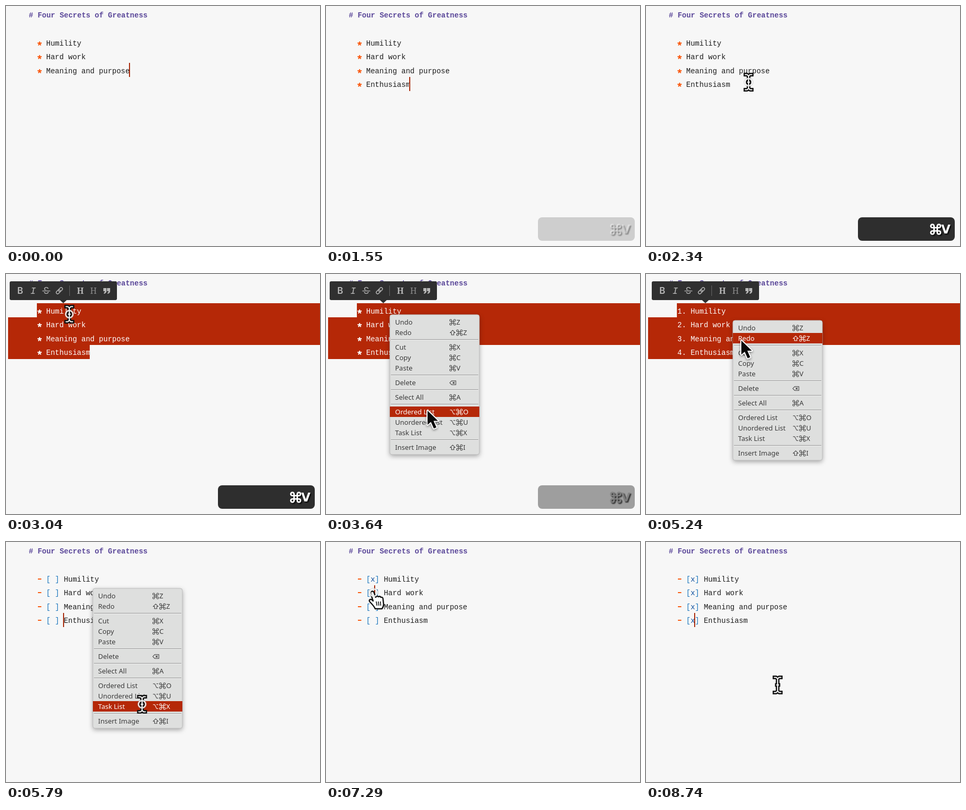
Write an HTML page with a canvas that moves like this. It is 600 by 460 pixels and loops after 9.74 s.

```html
<!DOCTYPE html>
<html lang="en">
<head>
<meta charset="utf-8">
<title>Four Secrets of Greatness</title>
<style>
html, body { margin: 0; width: 100%; height: 100%; overflow: hidden; background: #f7f7f7; }
canvas { display: block; width: 600px; height: 460px; }
</style>
</head>
<body>
<canvas id="stage" width="600" height="460"></canvas>
<script>
(() => {
const ctx = document.getElementById('stage').getContext('2d');
const LOOP = 9740, CH = 8.4, LEFT = 60;
const RED = '#b52807', ORANGE = '#f9590f', BLUE = '#1c76bd', INK = '#1c1c1c';
const MONO = '14px "Liberation Mono", monospace';
const ITEMS = ['Humility', 'Hard work', 'Meaning and purpose', 'Enthusiasm'];

const T = { type: 260, keys: 1550, ordered: 3900, task: 5750 };
const CHECKS = [6880, 7260, 7590, 7890];
const DRAGS = [
  { from: 2350, to: 2850, end: T.ordered, anchor: 160 },
  { from: 4270, to: 4800, end: T.task, anchor: 168 }
];
const MENUS = [
  { x: 122, y: 78, from: 3050, to: 3960 },
  { x: 166, y: 89, from: 5100, to: 5850 }
];
const PRESSES = [[2320, 2850], [3030, 3090], [3860, 3940], [4270, 4800], [5080, 5140], [5720, 5840],
  ...CHECKS.map(t => [t - 10, t + 80])];

// time, x, y, shape used from that time on
const POINTER = [
  [1950, 262, 78, 'beam'], [2100, 286, 128, 'beam'], [2290, 196, 146, 'beam'], [2360, 196, 146, 'beam'],
  [2760, 54, 64, 'beam'], [2860, 54, 64, 'beam'], [3010, 121, 77, 'beam'], [3050, 121, 77, 'arrow'],
  [3600, 194, 262, 'arrow'], [3940, 194, 262, 'beam'], [4230, 172, 150, 'beam'], [4280, 172, 150, 'beam'],
  [4640, 29.5, 78, 'beam'], [4740, 40, 64, 'beam'], [4810, 40, 64, 'beam'], [5060, 165, 87, 'beam'],
  [5100, 165, 87, 'arrow'], [5620, 260, 311, 'arrow'], [5740, 260, 311, 'beam'], [5980, 260, 311, 'beam'],
  [6650, 98, 86, 'hand'], [6800, 91, 71, 'hand'], [6980, 91, 71, 'hand'], [7200, 91, 97, 'hand'],
  [7350, 91, 97, 'hand'], [7530, 91, 123, 'hand'], [7660, 91, 123, 'hand'], [7830, 91, 145, 'hand'],
  [7960, 91, 145, 'hand'], [8060, 112, 166, 'beam'], [8540, 251.5, 274, 'beam']
];

const MENU_ROWS = [
  ['Undo', 'cZ', 14], ['Redo', 'scZ', 34], ['Cut', 'cX', 62], ['Copy', 'cC', 82], ['Paste', 'cV', 102],
  ['Delete', 'd', 130], ['Select All', 'cA', 158], ['Ordered List', 'ocO', 186],
  ['Unordered List', 'ocU', 206], ['Task List', 'ocX', 226], ['Insert Image', 'scI', 254]
];
const RULES = [47, 115, 143, 171, 239];

const clamp = (v, a = 0, b = 1) => Math.min(b, Math.max(a, v));
const ease = p => p * p * (3 - 2 * p);
const within = (t, [a, b]) => t >= a && t < b;
const rowTop = i => Math.round(56 + 26.7 * i);
const baseline = i => Math.round(76 + 26.4 * i);

function text(s, x, y, color, font) {
  if (font) ctx.font = font;
  ctx.fillStyle = color;
  ctx.fillText(s, x, y);
}
function box(x, y, w, h, color, r = 0) {
  ctx.fillStyle = color;
  ctx.beginPath();
  ctx.roundRect(x, y, w, h, r);
  ctx.fill();
}
function stroke(d, color, width) {
  ctx.strokeStyle = color;
  ctx.lineWidth = width;
  ctx.stroke(new Path2D(d));
}
function at(x, y, draw, k = 1) {
  ctx.save();
  ctx.translate(x, y);
  ctx.scale(k, k);
  draw();
  ctx.restore();
}

function star(x, y, color) {
  ctx.strokeStyle = color;
  ctx.lineWidth = 2;
  ctx.beginPath();
  for (let i = 0; i < 5; i++) {
    const a = -Math.PI / 2 + i * Math.PI * 0.4;
    ctx.moveTo(x, y);
    ctx.lineTo(x + 4.1 * Math.cos(a), y + 4.1 * Math.sin(a));
  }
  ctx.stroke();
}

function typed(t) {
  return clamp(Math.floor((t - 300) / 65) + 1, 0, 10);
}

// tint replaces every colour when the text is selected
function list(t, tint) {
  ctx.font = MONO;
  ITEMS.forEach((item, i) => {
    const y = baseline(i);
    let col = 2;
    if (i === 3) {
      if (t < T.type) return;
      item = item.slice(0, typed(t));
    }
    if (t < T.ordered) star(LEFT + 4.2, y - 4, tint || ORANGE);
    else if (t < T.task) {
      text(i + 1 + '.', LEFT, y, tint || ORANGE);
      col = 3;
    } else {
      box(LEFT + 1, y - 6, 6.5, 2, tint || ORANGE);
      text('[ ]', LEFT + 2 * CH, y, tint || BLUE);
      if (t >= CHECKS[i]) text('x', LEFT + 3 * CH, y, tint || '#0c4f9e');
      col = 6;
    }
    text(item, LEFT + col * CH, y, tint || INK);
  });
}

function pointer(t) {
  if (t < POINTER[0][0]) return null;
  const n = POINTER.findIndex(p => p[0] > t);
  if (n < 0) return POINTER[POINTER.length - 1].slice(1);
  const [t0, x0, y0, shape] = POINTER[n - 1], [t1, x1, y1] = POINTER[n];
  const p = ease((t - t0) / (t1 - t0));
  return [x0 + (x1 - x0) * p, y0 + (y1 - y0) * p, shape];
}

function selection(t) {
  const drag = DRAGS.find(d => within(t, [d.from, d.end]));
  if (!drag) return null;
  const [x, y] = pointer(Math.min(t, drag.to));
  const line = clamp(Math.floor((y + 6 - 56) / 26.7), 0, 3);
  const x0 = Math.min(59 + CH * Math.max(0, Math.round((x - LEFT) / CH)), line === 3 ? drag.anchor : 600);
  return { ...drag, line, x0 };
}

function drawSelection(s, t) {
  ctx.save();
  ctx.beginPath();
  for (let i = s.line; i < 4; i++) {
    const l = i === s.line ? s.x0 : 4, r = i === 3 ? s.anchor : 600;
    ctx.rect(l, rowTop(i), Math.max(0, r - l), rowTop(i + 1) - rowTop(i));
  }
  ctx.clip();
  box(0, 0, 600, 460, RED);
  list(t, '#fff');
  ctx.restore();
  if (s.anchor === 168) box(168, 140, 2, 20, RED);
}

function drawCaret(t) {
  let line = 3, col = 2 + typed(t), on = true;
  if (t < T.type) [line, col] = [2, 21];
  else if (t < T.ordered) on = t < 1150 || within(t, [1550, 1950]);
  else if (t < T.task) col = 3;
  else if (t < CHECKS[0]) {
    col = 6;
    on = t < 6250 || t > 6600;
  } else {
    line = CHECKS.filter(c => t >= c).length - 1;
    col = 4;
    on = !within(t, [8490, 8740]);
  }
  if (on) box(Math.floor(LEFT + col * CH - 1), rowTop(line), 2, rowTop(line + 1) - rowTop(line), '#a92b0c');
}

function toolbar(s) {
  const c = (Math.min(s.x0, s.anchor - 20) + s.anchor) / 2;
  const grey = '#b8b8b8';
  at(Math.max(4, Math.floor(c - 102.5)), rowTop(s.line) - 42, () => {
    box(0, 0, 205, 36, '#303030', 3);
    ctx.fill(new Path2D('M96 36h13l-6.5 6z'));
    ctx.textAlign = 'center';
    text('B', 20, 24, grey, '600 17px Inter, sans-serif');
    text('I', 45, 24, grey, 'italic 18px "Liberation Mono", monospace');
    text('S', 70, 24, grey, '17px Inter, sans-serif');
    stroke('M62.5 18.5h15', '#303030', 3.5);
    stroke('M62.5 18.5h15', grey, 1.3);
    at(95, 18, () => {
      ctx.rotate(-Math.PI / 4);
      ctx.strokeStyle = grey;
      ctx.lineWidth = 1.5;
      for (const x of [-7.5, -1.5]) {
        ctx.beginPath();
        ctx.roundRect(x, -2.7, 9, 5.4, 2.7);
        ctx.stroke();
      }
    });
    box(114, 8, 1, 20, '#666');
    text('H', 135, 24, grey, '600 16px "Noto Serif", serif');
    text('H', 160, 24, '#8c8c8c', '16px "Noto Serif", serif');
    ctx.fillStyle = grey;
    for (const x of [179, 186]) ctx.fill(new Path2D(`M${x} 13h6v6q0 4 -5 5v-2q2 -1 2 -3h-3z`));
  });
}

// 12 unit wide key symbols, centred on the origin
const KEYS = {
  c: 'M-2 -4V4A2 2 0 1 1 -4 2H4A2 2 0 1 1 2 4V-4A2 2 0 1 1 4 -2H-4A2 2 0 1 1 -2 -4Z',
  s: 'M0 -5L5 0H2.4V4.5H-2.4V0H-5Z',
  o: 'M-5.5 -4H-2L2 4H5.5M1.5 -4H5.5',
  d: 'M-6 0L-2 -4H6.5V4H-2ZM0 -2L4 2M4 -2L0 2'
};

function menu(m, t) {
  const [px, py] = pointer(t);
  const inside = px >= m.x && px <= m.x + 171;
  ctx.save();
  ctx.globalAlpha = clamp((m.to + 50 - t) / 50);
  at(m.x, m.y, () => {
    ctx.shadowColor = 'rgba(0,0,0,.35)';
    ctx.shadowBlur = 10;
    ctx.shadowOffsetY = 3;
    box(0, 0, 171, 268, '#dedfde', 4);
    ctx.shadowColor = 'transparent';
    ctx.strokeStyle = '#bdbdbd';
    ctx.lineWidth = 1;
    ctx.stroke();
    for (const y of RULES) {
      box(2, y, 167, 1, '#959595');
      box(2, y + 1, 167, 1, '#f2f2f2');
    }
    for (const [name, keys, y] of MENU_ROWS) {
      const hot = inside && Math.abs(py - m.y - y) < 10;
      const color = hot ? '#fff' : '#3b3b3b';
      if (hot) box(0, y - 10, 171, 20, RED);
      text(name, 10, y + 5, color, '13px "Noto Sans", sans-serif');
      [...keys].forEach((k, i) => {
        const x = 114 + 13 * i;
        if (KEYS[k]) at(x + 6, y + 0.5, () => stroke(KEYS[k], color, 1.1), 0.93);
        else text(k, x, y + 5, color);
      });
    }
  });
  ctx.restore();
}

function keyPanel(t) {
  const a = Math.min(clamp((t - T.keys + 50) / 250), clamp((3800 - t) / 360));
  if (a <= 0) return;
  ctx.save();
  ctx.globalAlpha = a;
  box(405, 405, 185, 45, '#2e2e2e', 8);
  ctx.globalAlpha = clamp(a * 2);
  const v = t > 3000 ? Math.round(255 - (1 - a) * 223) : 255;
  const color = `rgb(${v},${v},${v})`;
  ctx.shadowColor = 'rgba(0,0,0,.8)';
  ctx.shadowBlur = 2;
  ctx.shadowOffsetX = ctx.shadowOffsetY = 2;
  at(553.5, 428, () => stroke(KEYS.c, color, 1.9), 1.55);
  text('V', 564, 436, color, 'bold 23px "DejaVu Sans", sans-serif');
  ctx.restore();
}

const SHAPES = {
  beam() {
    const d = 'M-6 -14.5H-3L0 -12L3 -14.5H6M0 -12V12M-6 14.5H-3L0 12L3 14.5H6M-1.5 0H1.5';
    ctx.lineCap = 'square';
    stroke(d, '#111', 7);
    stroke(d, '#fafafa', 2.2);
  },
  arrow() {
    const d = 'M0 0V27L6.5 21.5L12 34L17 32L11.5 19.5H20Z';
    ctx.shadowColor = 'rgba(0,0,0,.4)';
    ctx.shadowBlur = 4;
    ctx.shadowOffsetY = 2;
    stroke(d, '#fff', 4);
    ctx.shadowColor = 'transparent';
    ctx.fillStyle = '#0a0a0a';
    ctx.fill(new Path2D(d));
  },
  hand() {
    const d = 'M-6 1Q-5 -4 0 -2L4 9Q6 5 9 8Q12 6 14 9Q18 8 18 13L19 22Q19 27 16 31H3Q1 26 -7 18Q-10 14 -6 13Q-3 13 -1 16Z';
    ctx.fillStyle = '#fff';
    ctx.fill(new Path2D(d));
    stroke(d, '#111', 2.4);
    stroke('M5 17L6.5 25M9 17L10 25M13 17L13.5 25', '#111', 1.6);
  }
};

function drawPointer(t) {
  const p = pointer(t);
  if (!p) return;
  const [x, y, shape] = p;
  at(x, y, () => {
    ctx.lineJoin = 'round';
    SHAPES[shape]();
  });
  if (!PRESSES.some(r => within(t, r))) return;
  ctx.beginPath();
  ctx.arc(x, y, 7, 0, 7);
  ctx.strokeStyle = 'rgba(120,120,120,.35)';
  ctx.lineWidth = 4;
  ctx.stroke();
  ctx.strokeStyle = 'rgba(255,255,255,.85)';
  ctx.lineWidth = 2.5;
  ctx.stroke();
}

function render(t) {
  box(0, 0, 600, 460, '#f7f7f7');
  text('# Four Secrets of Greatness', 43.6, 22, '#5a4799', 'bold ' + MONO);
  list(t);
  const s = selection(t);
  if (s) {
    drawSelection(s, t);
    if (t > s.from + 150) toolbar(s);
  } else drawCaret(t);
  keyPanel(t);
  const open = MENUS.find(m => within(t, [m.from, m.to + 50]));
  if (open) menu(open, t);
  drawPointer(t);
}

const start = performance.now();
function tick() {
  render((performance.now() - start) % LOOP);
  requestAnimationFrame(tick);
}
tick();
})();
</script>
</body>
</html>
```
